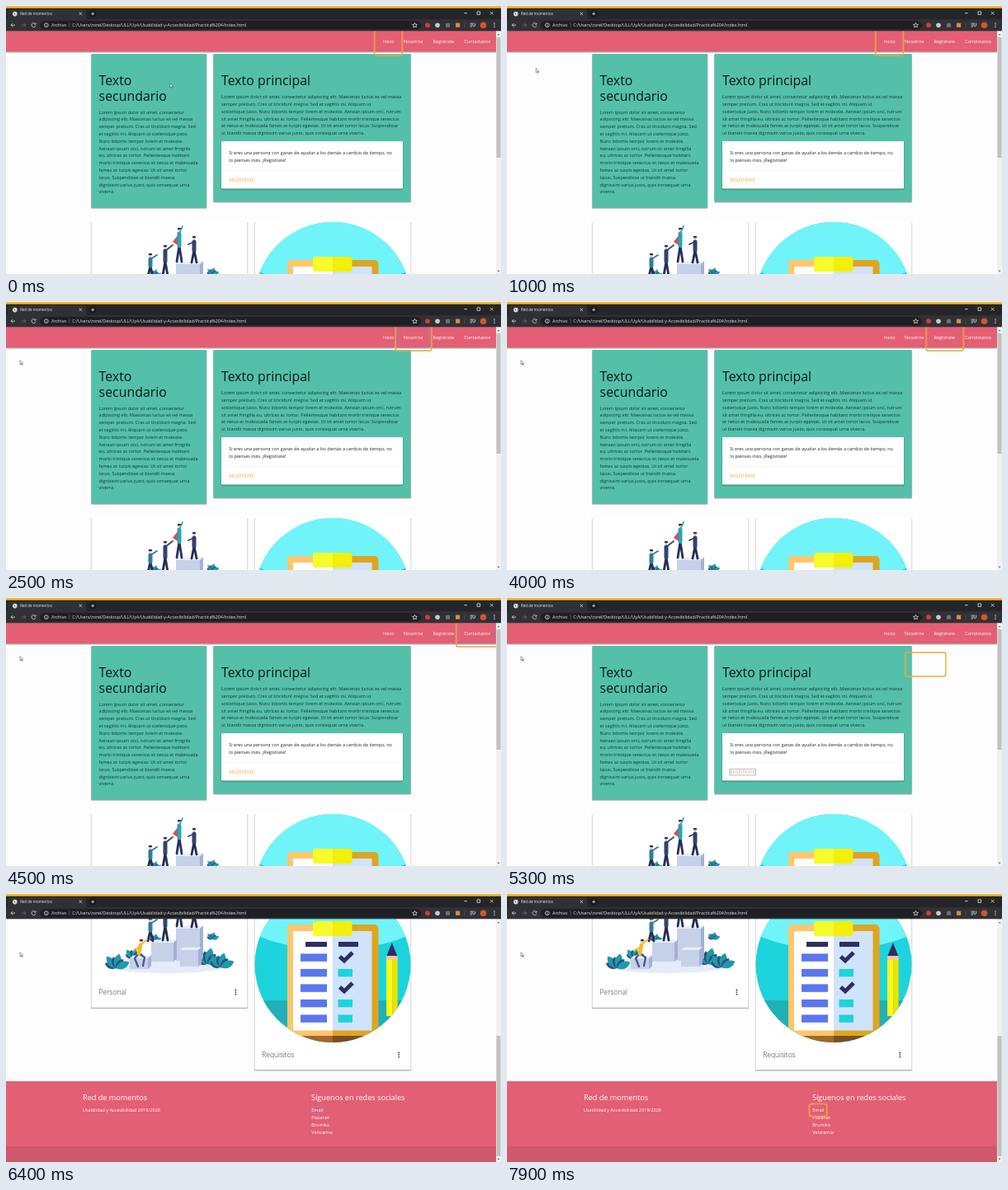
Animation, 600 px wide and 325 px high, one loop 8 s. Source, as an HTML page:

```html
<!DOCTYPE html>
<html lang="es">
<head>
<meta charset="utf-8">
<title>Red de momentos</title>
<style>
  html, body { margin: 0; width: 100%; height: 100%; overflow: hidden; background: #fff; }
  svg { display: block; width: 100%; height: 100%; font-family: "Open Sans", "Noto Sans", sans-serif; }
  text { white-space: pre; }
  .body { font-size: 5.48px; }
  .title { font-size: 15.9px; }
  .card { font-size: 8.5px; font-weight: 300; fill: #333; }
  .foot { font-size: 9.13px; fill: #fff; }
  .bar { font-size: 5.35px; fill: #e4e6e8; }
  .line { fill: none; stroke: #dfe1e3; stroke-width: .8; }
</style>
</head>
<body>
<svg viewBox="0 0 600 325" preserveAspectRatio="none">
  <defs>
    <clipPath id="view"><rect y="30" width="594" height="295"/></clipPath>
    <clipPath id="disc"><circle cx="396" cy="356.5" r="94.5"/></clipPath>
  </defs>
  <rect width="600" height="325" fill="#fdfdfd"/>

  <g clip-path="url(#view)">
    <g id="page">
      <g id="cards"></g>
      <g id="nav" class="body" fill="#fff"></g>
      <g class="title" fill="#0c1715">
        <text x="112.6" y="96">Texto</text>
        <text x="112.6" y="114.8">secundario</text>
        <text x="261" y="96">Texto principal</text>
      </g>
      <g id="copy" class="body" fill="#16322c"></g>

      <path d="M261 199.8h220" stroke="#e4e4e4" stroke-width=".5"/>
      <g id="offer" class="body" fill="#222"></g>
      <text class="body" x="270.3" y="213.1" fill="#f3a63c">REGÍSTRATE</text>

      <g id="team"></g>
      <g id="board" clip-path="url(#disc)"></g>
      <text class="card" x="112.6" y="393.4">Personal</text>
      <text class="card" x="310.2" y="469.4">Requisitos</text>
      <g id="dots"></g>

      <rect y="498" width="594" height="98" fill="#e35f73"/>
      <rect y="577" width="594" height="19" fill="#d0586a"/>
      <text class="foot" x="93" y="521.2">Red de momentos</text>
      <text class="foot" x="370" y="521.2">Síguenos en redes sociales</text>
      <text class="body" x="93" y="535.2" fill="#fff">Usabilidad y Accesibilidad 2019/2020</text>
      <g id="links" class="body" fill="#fff"></g>

      <rect id="focus" fill="none" stroke="#8294e0" stroke-width=".8"/>
      <rect id="glow" fill="none" stroke="#ffd98a" stroke-width="2.2" opacity=".3"/>
      <rect id="ring" fill="none" stroke="#e9a02e" stroke-width="1.2"/>
    </g>
  </g>

  <rect x="594" y="30" width="6" height="295" fill="#f1f1f1"/>
  <rect id="thumb" x="594.5" width="5" height="146" fill="#c1c1c1"/>
  <path d="M595.6 35.3l1.4-1.6 1.4 1.6zM595.6 320.8l1.4 1.6 1.4-1.6z" fill="#555"/>

  <rect width="600" height="16.5" fill="#242528"/>
  <rect width="600" height="2.7" fill="#f5bd20"/>
  <path d="M2 16.5V6.500q0-2.500 2.500-2.500h90q2.500 0 2.500 2.500v10z" fill="#303135"/>
  <rect y="16" width="600" height="14.3" fill="#303135"/>
  <rect x="41" y="18" width="462" height="10.6" rx="5.3" fill="#1e1f22"/>
  <circle cx="10.8" cy="9.6" r="2.8" fill="#e8eaed"/>
  <path d="M9 8.500l1.600.5-.3 1.600M11.600 11.200l1.200-1.600" fill="none" stroke="#55585c" stroke-width=".7"/>
  <text x="17" y="11.3" font-size="4.55" fill="#e8eaed">Red de momentos</text>
  <circle cx="105.2" cy="9.4" r="4.3" fill="#1a1b1d"/>
  <path class="line" d="M88.700 7.700l3.300 3.300m0-3.300l-3.300 3.300M103.200 9.400h4m-2-2v4M555 8.700h4M571 6.800h3.600v3.600h-3.600zM586.800 6.800l3.700 3.700m0-3.700l-3.700 3.700"/>
  <path class="line" d="M11 23.200H6.200m2.200-2.300l-2.300 2.300 2.300 2.300M35.600 21.700a2.500 2.500 0 1 0 .3 2.200m0-3.200v1.500h-1.600"/>
  <path class="line" d="M18.700 23.200h4.800m-2.200-2.300l2.300 2.300-2.300 2.300" opacity=".4"/>
  <circle class="line" cx="48.8" cy="23.2" r="2.4"/>
  <path class="line" d="M48.800 22.900v1.500m0-2.800v.5"/>
  <text class="bar" x="55" y="25.1">Archivo</text>
  <path d="M77 20.500v5.400" stroke="#74777a" stroke-width=".6"/>
  <text class="bar" x="80.3" y="25.1">C:/Users/zorel/Desktop/ULL/UyA/Usabilidad-y-Accesibilidad/Practica%204/index.html</text>
  <path class="line" d="M495.500 20.400l.9 1.900 2 .2-1.500 1.400.4 2-1.800-1-1.800 1 .4-2-1.500-1.400 2-.2z" stroke-width=".6"/>
  <circle cx="511" cy="23.2" r="2.9" fill="#d93a36"/>
  <circle cx="523" cy="23.2" r="2.8" fill="#c9cbce"/>
  <rect x="533" y="20.8" width="5" height="5" fill="#6d6f73"/>
  <rect x="545" y="20.6" width="5.2" height="5.2" fill="#d58a4c"/>
  <path d="M556 19.500v7.400" stroke="#5b5d61" stroke-width=".6"/>
  <path class="line" d="M562.500 21.200h4.600m-4.600 1.900h4.600m-4.600 1.900h2.600m1.200 0l2.400-1.200v-3"/>
  <circle cx="578.5" cy="23.2" r="3.8" fill="#d4562c"/>
  <g fill="#e8eaed"><circle cx="592" cy="21" r=".65"/><circle cx="592" cy="23.2" r=".65"/><circle cx="592" cy="25.4" r=".65"/></g>

  <path id="cursor" d="M0 0v5l1.200-1.100.9 2 .8-.4-.9-1.900h1.600z" fill="#fff" stroke="#333" stroke-width=".5"/>
</svg>

<script>
const $ = id => document.getElementById(id);
const LOOP = 8000, LEAD = 8.8, SCROLL = 271;

const rect = (x, y, w, h, fill, more = '') =>
  `<rect x="${x}" y="${y}" width="${w}" height="${h}" fill="${fill}" ${more}/>`;
const path = (d, fill) => `<path d="${d}" fill="${fill}"/>`;
const stroke = (d, color, w) =>
  `<path d="${d}" fill="none" stroke="${color}" stroke-width="${w}" stroke-linecap="round" stroke-linejoin="round"/>`;
const dot = (x, y, r, fill) => `<circle cx="${x}" cy="${y}" r="${r}" fill="${fill}"/>`;
const lines = (x, y, list) =>
  list.map((s, i) => `<text x="${x}" y="${y + i * LEAD}">${s}</text>`).join('');

// A raised panel: soft rim, firm lower edge, then the face
const card = (x, y, w, h, fill) =>
  rect(x - .8, y, w + 1.6, h + 1.7, '#000', 'rx="1.2" opacity=".1"') +
  rect(x - .2, y, w + .4, h + .9, '#000', 'rx="1" opacity=".26"') +
  rect(x, y, w, h, fill, 'rx=".8"');

$('cards').innerHTML =
  card(0, 30, 594, 25.3, '#e45f73') +
  card(103.5, 58.3, 139.5, 186.3, '#54c0a9') +
  card(251.5, 58.3, 239, 179, '#54c0a9') +
  card(261, 164, 220, 57.5, '#fff') +
  card(103.5, 262, 189, 146.8, '#fff') +
  card(301.5, 262, 189, 222.3, '#fff');

$('nav').innerHTML = [['Inicio', 457], ['Nosotros', 482], ['Regístrate', 517.6], ['Contáctanos', 555.3]]
  .map(([s, x]) => `<text x="${x}" y="45.4">${s}</text>`).join('');

$('copy').innerHTML = lines(112.6, 130.5, [
  'Lorem ipsum dolor sit amet, consectetur',
  'adipiscing elit. Maecenas luctus ex vel massa',
  'semper pretium. Cras ut tincidunt magna. Sed',
  'et sagittis mi. Aliquam ut scelerisque justo.',
  'Nunc lobortis tempor lorem et molestie.',
  'Aenean ipsum orci, rutrum sit amet fringilla',
  'eu, ultrices ac tortor. Pellentesque habitant',
  'morbi tristique senectus et netus et malesuada',
  'fames ac turpis egestas. Ut sit amet tortor',
  'lacus. Suspendisse ut blandit massa.',
  'dignissim varius justo, quis consequat urna',
  'viverra.'
]) + lines(261, 112.2, [
  'Lorem ipsum dolor sit amet, consectetur adipiscing elit. Maecenas luctus ex vel massa',
  'semper pretium. Cras ut tincidunt magna. Sed et sagittis mi. Aliquam ut',
  'scelerisque justo. Nunc lobortis tempor lorem et molestie. Aenean ipsum orci, rutrum',
  'sit amet fringilla eu, ultrices ac tortor. Pellentesque habitant morbi tristique senectus',
  'et netus et malesuada fames ac turpis egestas. Ut sit amet tortor lacus. Suspendisse',
  'ut blandit massa dignissim varius justo, quis consequat urna viverra.'
]);

$('offer').innerHTML = lines(270.3, 179.8, [
  'Si eres una persona con ganas de ayudar a los demás a cambio de tiempo, no',
  'lo pienses más. ¡Regístrate!'
]);
$('links').innerHTML = lines(370.3, 535.2, ['Email', 'Plazanet', 'Brumiko', 'Veloramia']);
$('dots').innerHTML = [[278.4, 390], [476.2, 466]]
  .map(([x, y]) => [-2.6, 0, 2.6].map(d => dot(x, y + d, .85, '#222')).join('')).join('');

// Clipboard picture
function drawBoard() {
  const navy = '#2c2f62', blue = '#5b76ee', cyan = '#1dd3dc';
  let s = rect(301, 262, 190, 190, cyan) + rect(301, 400, 190, 52, '#22b0b8');
  s += '<ellipse cx="396" cy="300" rx="110" ry="38" fill="#70f4fa"/>' + rect(301, 262, 190, 38, '#70f4fa');
  s += rect(341, 308, 110.5, 140, '#dfa520', 'rx="5"');
  s += path('M346 308h50v140h-55v-135q0-5 5-5z', '#ffc66c');
  s += rect(341, 443, 55, 9, '#a5662a') + rect(396, 443, 56, 9, '#7d4c20');
  s += rect(348, 316, 48, 120.5, '#fff') + rect(396, 316, 47.5, 120.5, '#cfe3fb');
  s += rect(372, 304, 47.5, 18, '#f3ee0a', 'rx="2.5"') + rect(372, 304, 24, 18, '#f6fb2c', 'rx="2.5"');
  s += rect(363, 329, 26, 6, navy) + rect(403, 329, 24, 6, navy);
  for (let i = 0; i < 5; i++) {
    const y = 343.4 + i * 18.5;
    s += rect(357, y, 32, 9.4, blue);
    s += i === 0 || i === 2
      ? `<path d="M404.500 ${y + 3.5}l5.500 5 10-10" fill="none" stroke="${navy}" stroke-width="5"/>`
      : rect(402.5, y, 17.5, 9.4, cyan);
  }
  s += path('M461 347l6.800-17 6.800 17z', navy) + rect(461, 346, 13.6, 6, '#f7c79a');
  s += rect(461, 351, 7.5, 68, '#fbf916') + rect(468.5, 351, 6.1, 68, '#ece400');
  return s;
}

// Team on a podium
function leaf(x, y, angle, size, color) {
  return `<path transform="translate(${x} ${y}) rotate(${angle})" d="M0 0q${-size * .5} ${-size * .5} 0 ${-size}q${size * .5} ${size * .5} 0 ${size}" fill="${color}"/>`;
}
function plant(x, y, size) {
  return [-65, -38, -12, 14, 40, 66]
    .map((a, i) => leaf(x, y, a, size * (i % 2 ? 1 : .8), i % 2 ? '#1f9aa9' : '#2c4f80')).join('');
}
function block(x, y, w, bottom) {
  return rect(x, y, w, bottom - y, '#c6d0e8') +
    path(`M${x} ${y}l4-3.500h${w}l-4 3.500z`, '#e7edfa') +
    path(`M${x + w} ${y}l4-3.500v${bottom - y}l-4 3.500z`, '#a3b0d2');
}
function person(x, head, feet, top, legs, arm) {
  const hip = head + (feet - head) * .5;
  return stroke(`M${x} ${hip}L${x - 3} ${feet}M${x} ${hip}L${x + 3} ${feet}`, legs, 2.8) +
    stroke(`M${x} ${head + 5}V${hip}`, top, 5) +
    stroke(`M${x} ${head + 5}l${arm}`, top, 1.8) +
    dot(x, head, 2.1, '#efb295') + path(`M${x - 2.3} ${head}a2.300 2.300 0 0 1 4.600 0z`, '#2b2d4c');
}
function drawTeam() {
  let s = '<ellipse cx="194" cy="357" rx="76" ry="10" fill="#e4ecfb"/>';
  s += plant(133, 361, 18) + plant(154, 349, 13) + plant(180, 328, 9) + plant(250, 326, 9);
  s += plant(244, 356, 20) + plant(260, 360, 18);
  s += block(206, 313, 29, 352) + block(176, 330, 27, 353) + block(211, 339, 22, 359) + block(150, 349, 22, 362);
  s += path('M209 277l-7 9 6 4z', '#dd4a4a');
  s += person(210, 271, 310, '#2aa5b9', '#27305c', '4-9');
  s += person(228, 281, 311, '#34406f', '#272d52', '-7 3');
  s += person(193, 292, 327, '#2f4674', '#272d52', '9-7');
  s += person(175, 302, 328, '#2d7f9c', '#272d52', '8-5');
  s += stroke('M161 343l-5 6 4 10M161 343l7 5-2 10', '#44568c', 2.3);
  s += stroke('M163 333l-2 10', '#f4bb2c', 4.8) + stroke('M163 333l8-7M162 335l-8 5', '#f4bb2c', 1.8);
  s += dot(164, 328, 2.2, '#efb295') + path('M161.700 328a2.300 2.300 0 0 1 4.600 0z', '#2b2d4c');
  return s;
}
$('board').innerHTML = drawBoard();
$('team').innerHTML = drawTeam();

// Focus stops: start time, element box, ring gap
const FLIGHT = 200, OUTLINE = 300;
const stops = [
  { at: -1000, box: [451, 30, 25, 25.3], gap: 4.3 },
  { at: 2300, box: [476, 30, 36, 25.3], gap: 3.8 },
  { at: 3300, box: [512, 30, 37.5, 25.3], gap: 3.8 },
  { at: 4300, box: [549.5, 30, 44.3, 25.3], gap: 3.8 },
  { at: 5256, box: [270, 207.3, 31.5, 7.6], gap: 4 },
  { at: 6370, box: [370, 529, 14.3, 8], gap: 3.5 }
];
const outer = ({ box: [x, y, w, h], gap: g }) => [x - g, y - g, w + 2 * g, h + 2 * g];

// Pointer path: time, x, y
const pointer = [[0, 199, 94], [650, 199, 94], [1100, 12, 73], [1400, 12, 73], [1650, 17, 70.8], [LOOP, 17, 70.8]];

const clamp = v => Math.max(0, Math.min(1, v));
const mix = (a, b, k) => a + (b - a) * k;
const ease = k => k * k * (3 - 2 * k);

function place(el, [x, y, w, h], r) {
  Object.entries({ x, y, width: w, height: h, rx: r }).forEach(([k, v]) => el.setAttribute(k, v));
}

function render(t) {
  const n = stops.filter(s => s.at <= t).length - 1;
  const stop = stops[n], age = t - stop.at;
  const from = outer(stops[Math.max(0, n - 1)]), to = outer(stop);
  const k = clamp(age / FLIGHT);
  const box = from.map((v, i) => mix(v, to[i], k));
  place($('ring'), box, 2.5);
  place($('glow'), box, 2.5);
  place($('focus'), stop.box, 0);
  $('focus').setAttribute('opacity', age < OUTLINE ? .8 : 0);

  const down = n === stops.length - 1;
  $('page').setAttribute('transform', `translate(0 ${down ? -SCROLL : 0})`);
  $('thumb').setAttribute('y', down ? 172 : 38);

  const i = pointer.findIndex(p => p[0] > t);
  const [a, b] = [pointer[i - 1], pointer[i]];
  const m = ease((t - a[0]) / (b[0] - a[0]));
  $('cursor').setAttribute('transform', `translate(${mix(a[1], b[1], m)} ${mix(a[2], b[2], m)})`);
}

const start = performance.now();
function tick() {
  render((performance.now() - start) % LOOP);
  requestAnimationFrame(tick);
}
tick();
</script>
</body>
</html>
```
